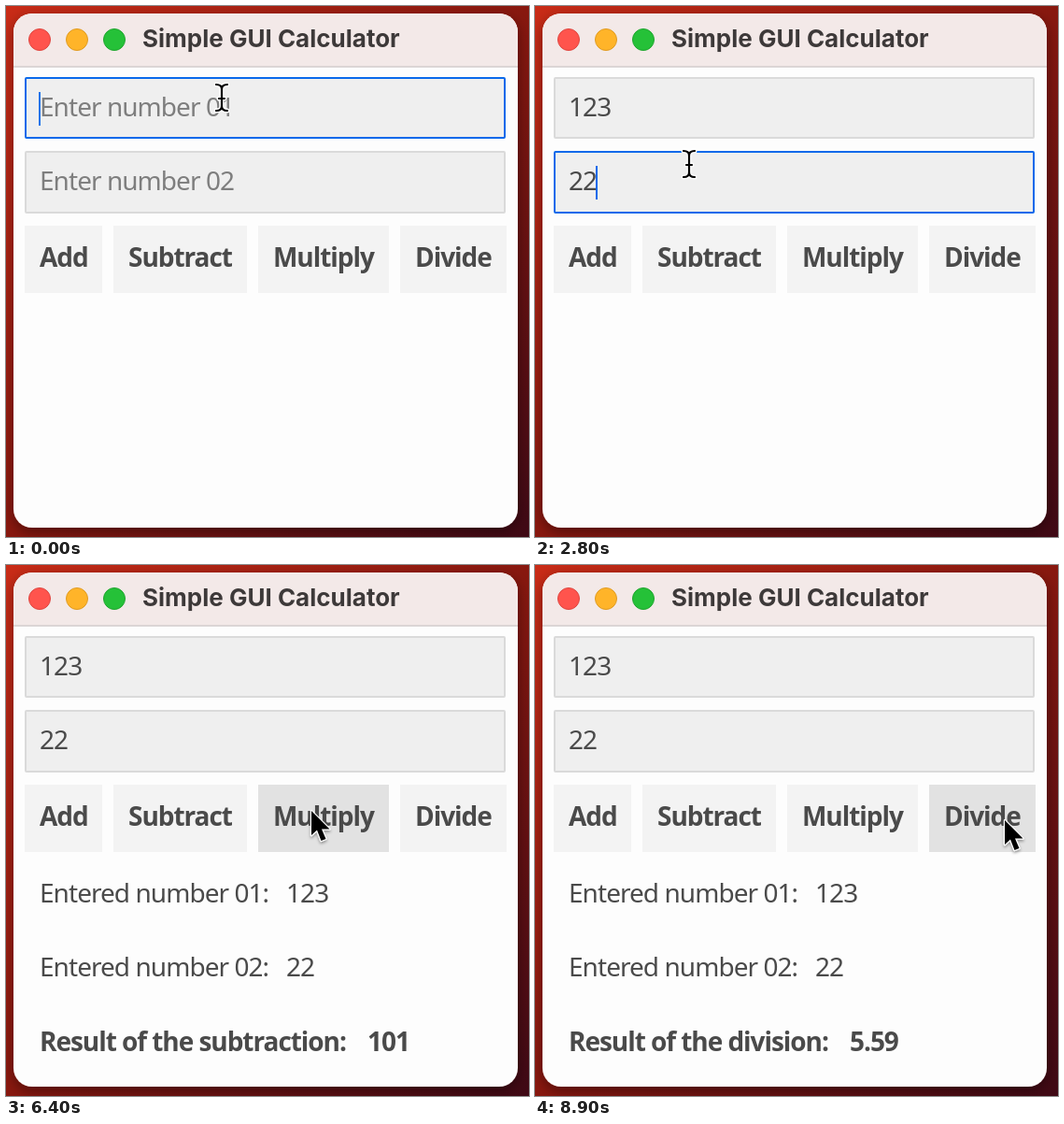
Recreate the animation shown at these times as an HTML page. Size 560 px wide and 568 px high, loop 9000 ms.

```html
<!DOCTYPE html>
<html lang="en">
<head>
<meta charset="utf-8">
<title>Simple GUI Calculator</title>
<style>
  html, body { margin: 0; width: 560px; height: 568px; overflow: hidden; }
  svg { display: block; }
  text { font: 28px "Noto Sans", "Open Sans", sans-serif; letter-spacing: -.95px; fill: #4a4a4a; }
  .bold { font-weight: 700; letter-spacing: -1.05px; }
  .title { font: 700 26px Inter, "Liberation Sans", sans-serif; letter-spacing: 0; fill: #3d3939; }
  .field { fill: #efefef; stroke: #dadada; stroke-width: 2; }
  .field.focus { stroke: #0a69ea; }
  .hint { fill: #7e7e7e; }
  .button { fill: #f3f3f3; }
  .button.hover { fill: #e2e2e2; }
</style>
</head>
<body>
<svg width="560" height="568" viewBox="0 0 560 568">
  <defs>
    <linearGradient id="wall" x1="0" y1="0" x2="1" y2="1">
      <stop offset="0" stop-color="#ca2c17"/>
      <stop offset=".5" stop-color="#88180f"/>
      <stop offset="1" stop-color="#3f0915"/>
    </linearGradient>
    <filter id="shade" x="-10%" y="-10%" width="120%" height="120%">
      <feDropShadow dx="0" dy="4" stdDeviation="7" flood-opacity=".4"/>
    </filter>
    <filter id="soft" x="-50%" y="-50%" width="200%" height="200%">
      <feDropShadow dx="0" dy="2" stdDeviation="1.5" flood-opacity=".35"/>
    </filter>
  </defs>
  <rect width="560" height="568" fill="url(#wall)"/>
  <rect x="8" y="8" width="540" height="550" rx="20" fill="#fdfdfd" filter="url(#shade)"/>
  <path d="M8 65V28a20 20 0 0 1 20-20H528a20 20 0 0 1 20 20V65z" fill="#f3e9e8"/>
  <path d="M8 65H548" stroke="#d3cdcd" stroke-width="1.5"/>
  <g stroke-width="1">
    <circle cx="36" cy="36" r="11.5" fill="#ff544d" stroke="#de4640"/>
    <circle cx="76" cy="36" r="11.5" fill="#ffb429" stroke="#df9b22"/>
    <circle cx="116" cy="36" r="11.5" fill="#25c138" stroke="#1fa52f"/>
  </g>
  <text class="title" x="146" y="44">Simple GUI Calculator</text>
  <g id="fields"></g>
  <rect id="caret" width="2" height="36" fill="#0a69ea"/>
  <g id="buttons"></g>
  <g id="output">
    <text x="36" y="361">Entered number 01:</text><text x="300" y="361">123</text>
    <text x="36" y="440">Entered number 02:</text><text x="300" y="440">22</text>
    <text class="bold" id="label" x="36" y="520"></text><text class="bold" id="value" y="520"></text>
  </g>
  <g id="beam" fill="none" stroke-linecap="round">
    <path id="beamShape" d="M-6-14Q0-14 0-9Q0-14 6-14M0-9V9M-6 14Q0 14 0 9Q0 14 6 14M-3 1H3" stroke="#fff" stroke-width="5"/>
    <use href="#beamShape" id="beamInk"/>
    <path d="M-6-14Q0-14 0-9Q0-14 6-14M0-9V9M-6 14Q0 14 0 9Q0 14 6 14M-3 1H3" stroke="#000" stroke-width="2.2"/>
  </g>
  <path id="arrow" d="M0 0V26L6 20.5L10.5 32L15.5 30L11 19.5H19.5z" stroke="#fff" stroke-width="2.4"
    stroke-linejoin="round" paint-order="stroke" filter="url(#soft)"/>
</svg>
<script>
const LOOP = 9000, STEP = 100;
const $ = id => document.getElementById(id);

function add(parent, tag, attrs, text = '') {
  const el = document.createElementNS('http://www.w3.org/2000/svg', tag);
  for (const key in attrs) el.setAttribute(key, attrs[key]);
  el.textContent = text;
  parent.append(el);
  return el;
}

const fields = [
  { y: 76, h: 66, hint: 'Enter number 01', keys: [['1', 600], ['2', 800], ['3', 1000]] },
  { y: 155, h: 67, hint: 'Enter number 02', keys: [['2', 2300], ['2', 2600]] }
];
for (const f of fields) {
  f.box = add($('fields'), 'rect', { x: 21, y: f.y + 1, width: 513, height: f.h - 2, rx: 1 });
  f.text = add($('fields'), 'text', { x: 36, y: f.y + 42 });
}

const buttons = [['Add', 20, 83], ['Subtract', 115, 143], ['Multiply', 270, 140], ['Divide', 422, 114]]
  .map(([name, x, w]) => {
    const box = add($('buttons'), 'rect', { x, y: 235, width: w, height: 72 });
    add($('buttons'), 'text', { class: 'bold', x: x + 16, y: 279 }, name);
    return { x, w, box };
  });

// Time, operation, value, x of the value
const results = [
  [3900, 'addition', '145', 345],
  [5200, 'subtraction', '101', 387],
  [6700, 'multiplication', '2706', 419],
  [8400, 'division', '5.59', 337]
];

// Time, x, y of the pointer
const path = [
  [0, 231, 98], [1100, 231, 98], [1500, 165, 169], [2900, 165, 169], [3500, 75, 252], [4200, 75, 252],
  [4600, 186, 262], [5600, 186, 262], [6200, 327, 263], [7000, 327, 263], [7700, 515, 275],
  [7900, 515, 275], [8200, 503, 273], [LOOP, 503, 273]
];

function pointer(t) {
  const i = path.findIndex(p => p[0] > t);
  const [t0, x0, y0] = path[i - 1], [t1, x1, y1] = path[i];
  const u = (t - t0) / (t1 - t0), e = u * u * (3 - 2 * u);
  return [x0 + (x1 - x0) * e, y0 + (y1 - y0) * e];
}

function draw(t) {
  const [x, y] = pointer(t);
  const focus = t < 1600 ? 0 : t < 3900 ? 1 : -1;
  let overField = false;

  fields.forEach((f, i) => {
    const typed = f.keys.filter(k => k[1] <= t).map(k => k[0]).join('');
    f.text.textContent = typed || f.hint;
    f.text.setAttribute('class', typed ? '' : 'hint');
    f.box.setAttribute('class', i === focus ? 'field focus' : 'field');
    overField ||= y >= f.y && y < f.y + f.h;
    if (i !== focus) return;
    // The caret stays solid after a key or a click, then blinks
    const events = [i ? 1600 : -600, ...f.keys.map(k => k[1])];
    const idle = t - Math.max(...events.filter(e => e <= t));
    $('caret').setAttribute('x', 35 + 15 * typed.length);
    $('caret').setAttribute('y', f.y + 16);
    $('caret').setAttribute('opacity', idle < 550 ? 1 : Math.min(1, Math.max(0, .6 + Math.cos((idle - 400) / 1000 * 2 * Math.PI))));
  });
  $('caret').style.display = focus < 0 ? 'none' : '';

  for (const b of buttons) {
    const hover = y >= 235 && y < 307 && x >= b.x && x < b.x + b.w;
    b.box.setAttribute('class', hover ? 'button hover' : 'button');
  }

  const result = results.filter(r => r[0] <= t).pop();
  $('output').style.display = result ? '' : 'none';
  if (result) {
    $('label').textContent = `Result of the ${result[1]}:`;
    $('value').textContent = result[2];
    $('value').setAttribute('x', result[3]);
  }

  $('beam').style.display = overField ? '' : 'none';
  $('arrow').style.display = overField ? 'none' : '';
  $(overField ? 'beam' : 'arrow').setAttribute('transform', `translate(${x} ${y})`);
}

$('beamInk').remove();
const start = performance.now();
function tick() {
  const t = (performance.now() - start) % LOOP;
  draw(Math.floor(t / STEP) * STEP);
  requestAnimationFrame(tick);
}
tick();
</script>
</body>
</html>
```
